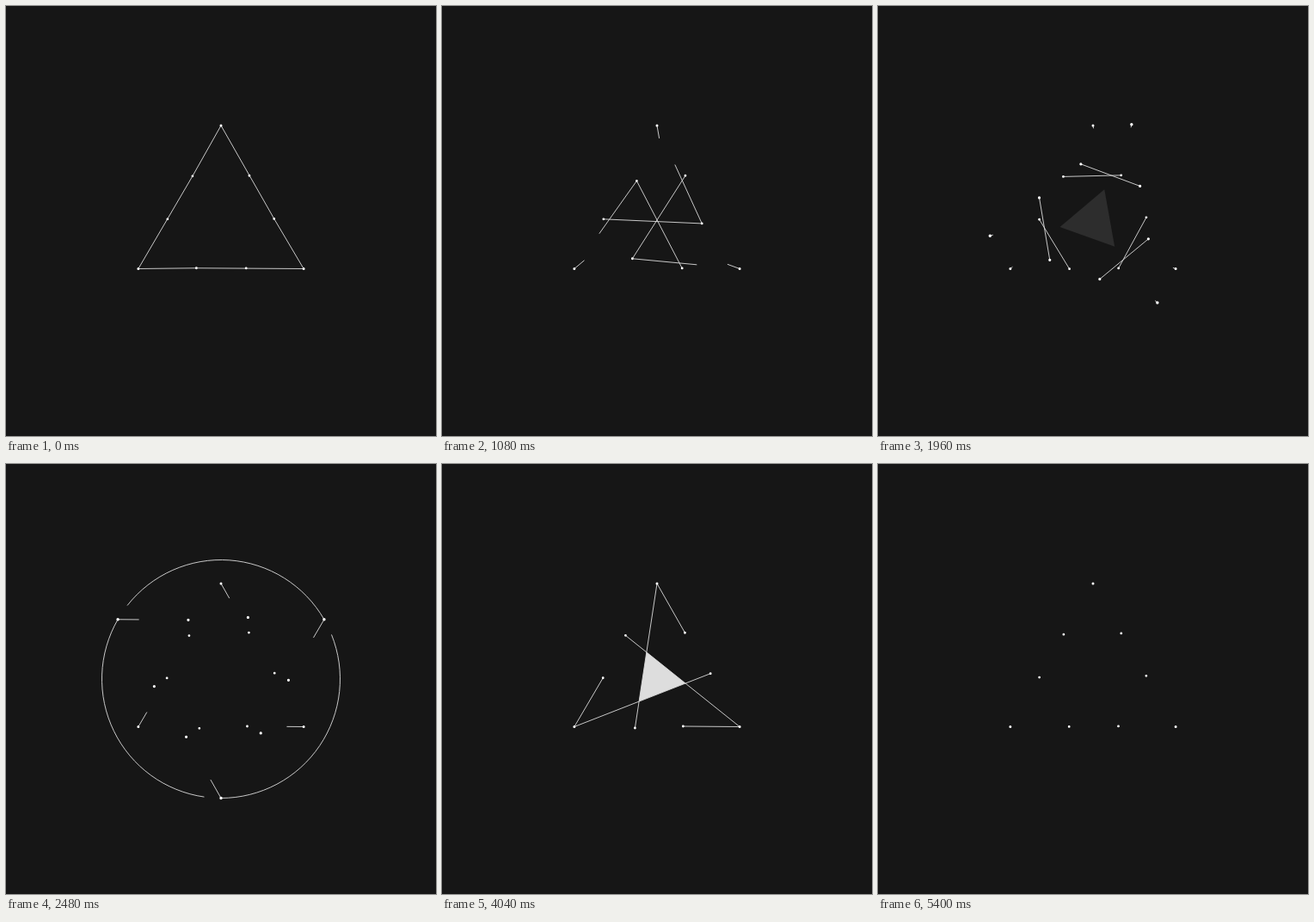
Write an HTML page that moves like this. It is 500 by 500 pixels and loops after 5.68 s.

```html
<!DOCTYPE html>
<html lang="en">
<head>
<meta charset="utf-8">
<title>Triangles</title>
<style>
html, body { margin: 0; width: 100%; height: 100%; overflow: hidden; background: #161616; }
svg { display: block; width: 100vw; height: 100vh; }
</style>
</head>
<body>
<svg viewBox="0 0 500 500">
  <rect width="500" height="500" fill="#161616"/>
  <path id="fill" fill="#e0e0e0"/>
  <path id="lines" fill="none" stroke="#dcdcdc" stroke-width="0.9"/>
  <path id="dots" fill="#fff"/>
</svg>
<script>
const LOOP = 5680, R = 111, GROWTH = 0.2477;
const el = id => document.getElementById(id);
const fill = el('fill'), lines = el('lines'), dots = el('dots');

const clamp = x => Math.max(0, Math.min(1, x));
const ease = p => p < 0.5 ? 4 * p ** 3 : 1 - 4 * (1 - p) ** 3;
const tween = (t, start, end) => ease(clamp((t - start) / (end - start)));
const mix = (a, b, p) => a + (b - a) * p;
const lerp = (a, b, p) => [mix(a[0], b[0], p), mix(a[1], b[1], p)];
const polar = (r, deg) => {
  const a = deg * Math.PI / 180;
  return [250 + r * Math.cos(a), 250 - r * Math.sin(a)];
};
const xy = p => p[0].toFixed(2) + ' ' + p[1].toFixed(2);

// Strokes between named points: [from, turn, to, turn, grow start, end, shrink start, end]
const strokes = [
  ['odd', 0, 'corner', 0, -2, -1, 5600, 5680, 0, 550],
  ['corner', 1, 'odd', 0, -2, -1, 740, 1473],
  ['odd', 0, 'even', 2, 100, 700, 1120, 1560],
  ['corner', 0, 'even', 2, 922, 1482, 1475, 2060, 'back'],
  ['even', 0, 'odd', 0, 1441, 1941, 1900, 2350],
  ['corner', 0, 'even', 0, 2227, 2827, 2929, 3529],
  ['odd', 0, 'corner', 2, 3223, 3923, 3880, 5400],
  ['even', 0, 'corner', 0, 3600, 4100, 4184, 4884]
];
// The first edge piece shrinks back to where it begins
strokes[0] = ['odd', 0, 'corner', 0, -2, -1, 0, 550, 'back'];

function segment(a, b, from, to) {
  return to - from > 0.002 ? 'M' + xy(lerp(a, b, from)) + 'L' + xy(lerp(a, b, to)) : '';
}

function arc(r, from, to) {
  if (to - from < 0.1) return '';
  return 'M' + xy(polar(r, from)) + `A${r} ${r} 0 0 0 ` + xy(polar(r, to));
}

function dot(p, r) {
  return `M${(p[0] - r).toFixed(2)} ${p[1].toFixed(2)}a${r} ${r} 0 1 0 ${2 * r} 0a${r} ${r} 0 1 0 ${-2 * r} 0z`;
}

function figure(t, turn, scale) {
  const twist = tween(t, 1650, 2340) - 0.75 * tween(t, 3800, 4500);
  const inset = 11 * (tween(t, 200, 800) - tween(t, 1100, 1560)) * scale;
  const set = { corner: [], odd: [], even: [] };
  for (let k = 0; k < 3; k++) {
    const a = turn + 120 * k;
    const odd = polar(mix(61.8, 62.6, twist) * scale, a + mix(122.4, 126.3, twist));
    const push = polar(inset, a - 30);
    set.corner.push(polar(R * scale, a + 90));
    set.odd.push([odd[0] + push[0] - 250, odd[1] + push[1] - 250]);
    set.even.push(polar(mix(62.2, 62.9, twist) * scale, a + mix(58, 59, twist)));
  }
  return set;
}

function drawLines(t, f) {
  let d = '';
  for (const [an, ai, bn, bi, g0, g1, s0, s1, back] of strokes) {
    const grow = tween(t, g0, g1), shrink = tween(t, s0, s1);
    for (let k = 0; k < 3; k++) {
      const a = f[an][(ai + k) % 3], b = f[bn][(bi + k) % 3];
      d += back ? segment(a, b, 0, grow - shrink) : segment(a, b, shrink, grow);
    }
  }
  return d;
}

function drawDots(f, size) {
  return f.corner.map(p => dot(p, 1.5 * size)).join('') +
    f.odd.concat(f.even).map(p => dot(p, 1.4 * size)).join('');
}

function cross([a, b], [c, d]) {
  const ux = b[0] - a[0], uy = b[1] - a[1], vx = d[0] - c[0], vy = d[1] - c[1];
  const s = ((c[0] - a[0]) * vy - (c[1] - a[1]) * vx) / (ux * vy - uy * vx);
  return [a[0] + ux * s, a[1] + uy * s];
}

function core(f, name, shift) {
  const side = k => [f.corner[k % 3], f[name][(k + shift) % 3]];
  return 'M' + [0, 1, 2].map(k => xy(cross(side(k), side(k + 1)))).join('L') + 'z';
}

function render(t) {
  const out = tween(t, 1650, 2340) - tween(t, 3110, 3800);
  const spin = 120 * tween(t, 4054, 4554);
  const small = figure(t, spin, 1);
  let l = drawLines(t, small), d = drawDots(small, 1);

  if (t > 1650 && t < 3800) {
    const scale = 1 + GROWTH * out;
    const big = figure(t, -60 * out, scale);
    l += drawLines(t, big);
    d += drawDots(big, 1.15);
    const head = 120 * tween(t, 2034, 2634), tail = 120 * tween(t, 2500, 3020);
    const glint = 3.3 * Math.sin(Math.PI * clamp((t - 3260) / 200));
    for (let k = 0; k < 3; k++) {
      const a = 90 - 60 * out + 120 * k;
      l += arc(R * scale, a + tail, a + head);
      l += arc(71.7, 128 + 120 * k - glint, 128 + 120 * k + glint);
    }
  }

  const early = t < 2600;
  const alpha = early
    ? tween(t, 1400, 1600) * (1 - tween(t, 1680, 2080))
    : tween(t, 3700, 4100) * (1 - tween(t, 4240, 4990));
  fill.setAttribute('d', early ? core(small, 'even', 2) : core(small, 'odd', 1));
  fill.setAttribute('opacity', alpha.toFixed(3));
  lines.setAttribute('d', l);
  dots.setAttribute('d', d);
}

const began = performance.now();
function tick() {
  const t = (performance.now() - began) % LOOP;
  render(Math.floor(t / 40) * 40);
  requestAnimationFrame(tick);
}
tick();
</script>
</body>
</html>
```
